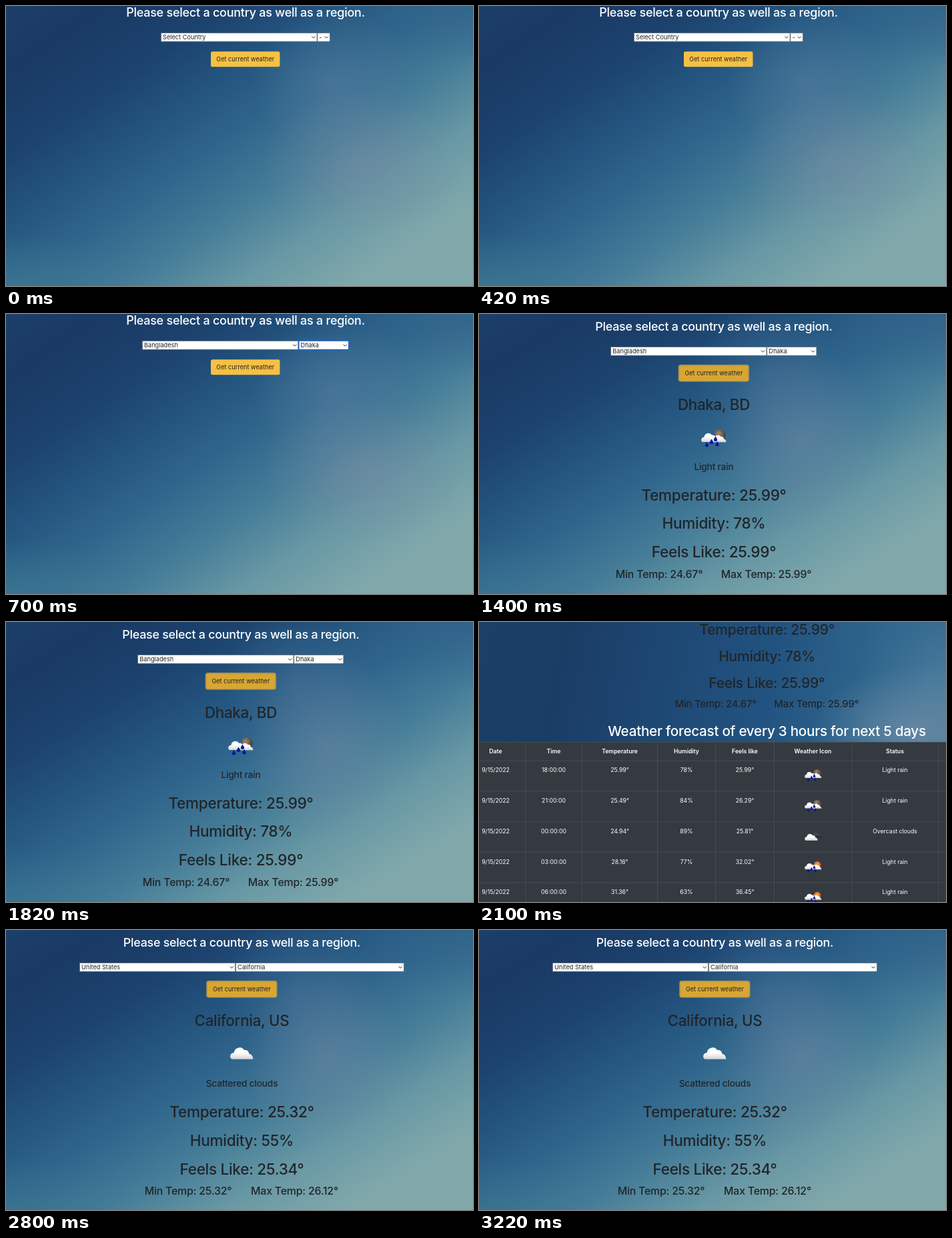
Write an HTML page that moves like this. It is 700x420 px and loops after 3500 ms.

```html
<!DOCTYPE html>
<html lang="en">
<head>
<meta charset="utf-8">
<title>Weather by region</title>
<style>
  html, body { margin: 0; width: 100%; height: 100%; overflow: hidden; background: #1c3f69; }
  body { --sea: #1c3f69, #193a64 11%, #1c426e 25%, #245680 37.5%, #32688d 49%,
    #467d98 61%, #6898a4 73%, #80a8ab 86%, #80a8aa; }
  svg { position: absolute; left: 0; top: 0; width: 700px; height: 420px; visibility: hidden;
        animation: show 3500ms step-end infinite; }
  @keyframes show { 0% { visibility: visible; } 20%, 100% { visibility: hidden; } }
  #defs { animation: none; width: 0; height: 0; }
  text { font-family: Inter, "Open Sans", sans-serif; fill: #212529; }
  .big { font-weight: 500; letter-spacing: -.014em; }
  .ui { font-size: 9.2px; }
  .cell { font-size: 8.7px; fill: #fff; }
  .white { fill: #fff; }
  .pick { background:
    radial-gradient(ellipse 150px 110px at 535px 235px, rgba(118,138,162,.55), transparent),
    radial-gradient(ellipse 120px 110px at 490px 115px, rgba(88,126,160,.5), transparent),
    radial-gradient(ellipse 190px 90px at 700px 0, rgba(47,97,137,.7), transparent),
    radial-gradient(ellipse 200px 80px at 0 420px, rgba(62,122,146,.7), transparent),
    linear-gradient(146deg, var(--sea)); }
  .report { background:
    radial-gradient(ellipse 120px 140px at 480px 190px, rgba(112,136,163,.5), transparent),
    radial-gradient(ellipse 110px 110px at 435px 90px, rgba(72,114,152,.4), transparent),
    radial-gradient(ellipse 220px 100px at 700px 0, rgba(47,97,137,.7), transparent),
    radial-gradient(ellipse 200px 80px at 0 420px, rgba(62,122,146,.5), transparent),
    linear-gradient(149deg, var(--sea)); }
  .table { background:
    radial-gradient(ellipse 150px 90px at 650px 160px, rgba(112,140,166,.7), transparent),
    radial-gradient(ellipse 200px 80px at 700px 0, rgba(46,98,139,.6), transparent),
    linear-gradient(102deg, #1c3f68, #1a3d66 18%, #1e4874 38%, #225380 58%, #2d638b 74%,
      #45799a 88%, #4c7f9c); }
</style>
</head>
<body>
<svg id="defs">
  <defs>
    <linearGradient id="fluff" x2="0" y2="1">
      <stop offset=".45" stop-color="#fff"/><stop offset="1" stop-color="#d2d4d6"/>
    </linearGradient>
    <linearGradient id="smoke" x2="0" y2="1">
      <stop offset="0" stop-color="#55585b"/><stop offset="1" stop-color="#222426"/>
    </linearGradient>
    <radialGradient id="moon" cx=".4" cy=".35">
      <stop offset="0" stop-color="#a08a78"/><stop offset="1" stop-color="#54463c"/>
    </radialGradient>
    <radialGradient id="sun">
      <stop offset=".2" stop-color="#f6a03c"/><stop offset="1" stop-color="#e2502c"/>
    </radialGradient>
  </defs>
</svg>
<script>
const LOOP = 3500, HOLD = 700;

const text = (x, y, str, cls, size, anchor = 'middle') =>
  `<text x="${x}" y="${y}" class="${cls}" text-anchor="${anchor}"${size ? ` font-size="${size}"` : ''}>${str}</text>`;
const rect = (x, y, w, h, attrs) => `<rect x="${x}" y="${y}" width="${w}" height="${h}" ${attrs}/>`;
const path = (d, attrs) => `<path d="${d}" ${attrs}/>`;
const group = (x, y, scale, body) => `<g transform="translate(${x} ${y}) scale(${scale})">${body}</g>`;

// Form controls
function select(x, y, w, label, focused) {
  const ring = focused
    ? rect(x, y - .3, w, 14.2, 'rx="2" fill="none" stroke="#2463c4" stroke-width="1.8"') : '';
  return rect(x + .4, y + .4, w - .8, 12.8, 'fill="#fff" stroke="#6b7075" stroke-width=".8"') + ring +
    text(x + 3, y + 10.2, label, 'ui', 0, 'start') +
    path(`M${x + w - 8.3} ${y + 5.6}l2.6 2.6 2.6-2.6`, 'fill="none" stroke="#333" stroke-width="1"');
}

function button(x, y, focused) {
  const ring = focused
    ? rect(x - .5, y - .5, 104.5, 24, 'rx="3" fill="none" stroke="#b8994c" stroke-width="1.6"') : '';
  return rect(x, y, 103.5, 23, `rx="2.5" fill="${focused ? '#d8a632' : '#f5c044'}"`) + ring +
    text(x + 51.8, y + 14.9, 'Get current weather', 'ui');
}

// Weather icons
const cloud = (x, y, scale, fill) => group(x, y, scale,
  path('M-11 6.5A4 4 0 0 1-8.5-.8A6.4 6.4 0 0 1 3.2-3.8A4.3 4.3 0 0 1 8.6.5Q13 1.2 13 6.5Z', `fill="url(#${fill})"`));
const drop = (x, y) => path(`M${x} ${y - 4}q5.4 7.4 0 7.4t0-7.4`, 'fill="#0b1a9c"');

function star(points, outer, inner) {
  const tips = Array.from({ length: points * 2 }, (_, i) => {
    const r = i % 2 ? inner : outer, a = i * Math.PI / points;
    return `${(r * Math.sin(a)).toFixed(2)} ${(-r * Math.cos(a)).toFixed(2)}`;
  });
  return 'M' + tips.join('L') + 'Z';
}

const orbs = {
  night: '<circle cx="9.5" cy="-5" r="9" fill="url(#moon)"/>',
  day: group(9.5, -5, 1, path(star(9, 9.5, 6), 'fill="url(#sun)"'))
};
const rain = orb => orbs[orb] + cloud(8.5, 0, .8, 'fluff') + cloud(-5.5, -1.5, 1, 'fluff') +
  drop(-10, 9) + drop(-3, 4.5) + drop(3, .5) + drop(5.5, 8);
const icons = {
  night: rain('night'),
  day: rain('day'),
  overcast: cloud(8, -3, .85, 'smoke') + cloud(-4, 1.5, 1.1, 'fluff'),
  scattered: cloud(0, 1.2, 1.32, 'fluff')
};

// Pages
const TITLE = 'Please select a country as well as a region.';

const picker = (x, first, second, w, focused) =>
  text(359, 16.2, TITLE, 'big white', 18) +
  select(x, 40, 234.5, first) + select(x + 234.5, 40, w, second, focused) + button(307, 68.2);

const report = r =>
  text(r.cx, 25.3, TITLE, 'big white', 17.9) +
  select(r.x, 49, 234, r.country) + select(r.x + 234, 49, r.w, r.region) +
  button(r.cx - 51.9, 77.3, true) +
  text(r.cx, 144.2, r.place, 'big', 22.4) +
  group(r.cx - .5, r.iconY, 1, icons[r.icon]) +
  text(r.cx, 234.3 + r.dy * .4, r.status, 'big', 13.7) +
  text(r.cx, 279.5 + r.dy * .7, `Temperature: ${r.temp}°`, 'big', 22.6) +
  text(r.cx, 322.3 + r.dy, `Humidity: ${r.humidity}%`, 'big', 22.6) +
  text(r.cx, 365 + r.dy, `Feels Like: ${r.feels}°`, 'big', 22.6) +
  text(r.minX, 395.8 + r.dy, `Min Temp: ${r.min}°`, 'big', 15.9) +
  text(r.maxX, 395.8 + r.dy, `Max Temp: ${r.max}°`, 'big', 15.9);

const COLS = [25, 112, 211, 311, 398.5, 500.5, 623.5];
const HEADS = ['Date', 'Time', 'Temperature', 'Humidity', 'Feels like', 'Weather Icon', 'Status'];
const ROWS = [
  ['18:00:00', '25.99°', '78%', '25.99°', 'night', 'Light rain'],
  ['21:00:00', '25.49°', '84%', '26.29°', 'night', 'Light rain'],
  ['00:00:00', '24.94°', '89%', '25.81°', 'overcast', 'Overcast clouds'],
  ['03:00:00', '28.16°', '77%', '32.02°', 'day', 'Light rain'],
  ['06:00:00', '31.36°', '63%', '36.45°', 'day', 'Light rain']
];

function forecast() {
  const top = 208.2, step = 45.7;
  const columns = [70, 154.5, 267.5, 354.5, 442.5, 559, 688.5].map(x => `M${x} 180V420`).join('');
  const lines = ROWS.map((_, i) => `M0 ${top + i * step}H700`).join('');
  const cells = ROWS.map((row, i) => ['9/15/2022', ...row].map((value, c) => {
    const y = top + i * step;
    return c === 5 ? group(500.5, y + 22.3, .68, icons[value]) : text(COLS[c], y + 17.2, value, 'cell');
  }).join('')).join('');
  return text(431.7, 19, 'Temperature: 25.99°', 'big', 21.1) +
    text(431.5, 59, 'Humidity: 78%', 'big', 21.1) +
    text(431.3, 98.8, 'Feels Like: 25.99°', 'big', 21.1) +
    text(354.7, 127.8, 'Min Temp: 24.67°', 'big', 14.9) +
    text(505.8, 127.8, 'Max Temp: 25.99°', 'big', 14.9) +
    text(431.5, 170.8, 'Weather forecast of every 3 hours for next 5 days', 'big white', 20.7) +
    rect(0, 180, 700, 240, 'fill="#343a40"') +
    path('M0 180.4H700' + columns + lines, 'fill="none" stroke="#484f56" stroke-width=".9"') +
    `<g font-weight="600">${HEADS.map((h, c) => text(COLS[c], 197.3, h, 'cell')).join('')}</g>` + cells;
}

const scenes = [
  ['pick', picker(232, 'Select Country', '-', 19.5)],
  ['pick', picker(204, 'Bangladesh', 'Dhaka', 75.5, true)],
  ['report', report({
    cx: 352, x: 197.3, w: 75, country: 'Bangladesh', region: 'Dhaka', place: 'Dhaka, BD',
    icon: 'night', iconY: 187, status: 'Light rain', temp: '25.99', humidity: 78, feels: '25.99',
    min: '24.67', max: '25.99', minX: 270, maxX: 430.5, dy: 0
  })],
  ['table', forecast()],
  ['report', report({
    cx: 353.5, x: 110, w: 252.8, country: 'United States', region: 'California', place: 'California, US',
    icon: 'scattered', iconY: 184, status: 'Scattered clouds', temp: '25.32', humidity: 55, feels: '25.34',
    min: '25.32', max: '26.12', minX: 273, maxX: 432.5, dy: 1.5
  })]
];

document.body.insertAdjacentHTML('beforeend', scenes.map(([cls, body], i) =>
  `<svg class="${cls}" viewBox="0 0 700 420" style="animation-delay:${i ? i * HOLD - LOOP : 0}ms">${body}</svg>`
).join(''));
</script>
</body>
</html>
```
